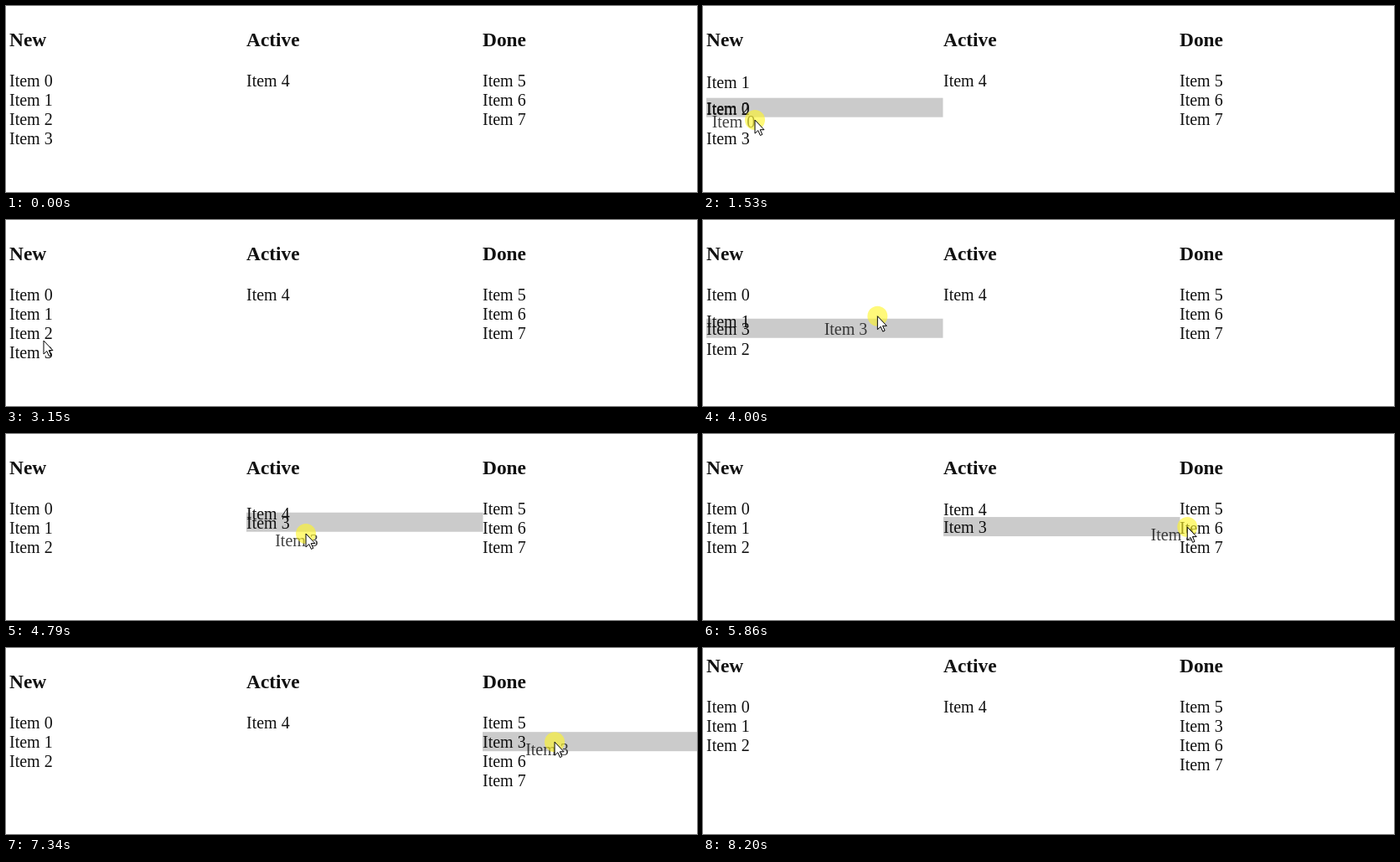
Recreate the animation shown at these times as an HTML page with a canvas. Size 825 px wide and 222 px high, loop 8.75 s.

```html
<!DOCTYPE html>
<html>
<head>
<meta charset="utf-8">
<style>
  html, body { margin: 0; width: 100%; height: 100%; overflow: hidden; background: #fff; }
  canvas { display: block; }
</style>
</head>
<body>
<canvas width="825" height="222"></canvas>
<script>
const ctx = document.querySelector('canvas').getContext('2d');
const LOOP = 8750, STEP = 10, SETTLE = 100, LAG = 30;
const LEFT = 4, COLUMN = 282.5, TOP = 77, ROW = 23, BASELINE = 19;
const titles = ['New', 'Active', 'Done'];
const FONT = '"Liberation Serif", "Times New Roman", serif';
const INK = '#111';
const clamp = (v, low, high) => Math.min(high, Math.max(low, v));

// Turning points of the pointer: time, x, y
const path = [
  [0, 400, 228], [700, 62, 90], [1000, 56, 87], [1400, 60, 110], [1530, 62, 136],
  [1850, 64, 157], [2600, 62, 90], [2850, 58, 90], [3150, 45, 144], [3450, 40, 151],
  [3750, 40, 151], [4200, 330, 88], [4560, 335, 86], [4790, 358, 119], [5100, 366, 72],
  [5400, 400, 92], [5860, 578, 111], [6200, 645, 77], [6450, 653, 90], [6640, 655, 132],
  [7000, 656, 118], [7400, 655, 112], [8080, 720, 245]
];

// dx, dy: where the item was grabbed
const drags = [
  { item: 0, from: 880, to: 2840, dx: 51, dy: 5 },
  { item: 3, from: 3600, to: 7380, dx: 35, dy: 3 }
];

function slope(i, axis) {
  const a = path[i], b = path[i + 1];
  return a && b ? (b[axis] - a[axis]) / (b[0] - a[0]) : null;
}

// Harmonic mean of both sides: smooth, without overshoot
function tangent(i, axis) {
  const before = slope(i - 1, axis), after = slope(i, axis);
  if (before === null || after === null) return before ?? after;
  return before * after > 0 ? 2 * before * after / (before + after) : 0;
}

function pointer(t) {
  const next = path.findIndex(p => p[0] > t);
  if (next < 0) return path.at(-1).slice(1);
  const i = next - 1, a = path[i], b = path[next];
  const h = b[0] - a[0], u = (t - a[0]) / h, v = 1 - u;
  return [1, 2].map(axis =>
    a[axis] + (b[axis] - a[axis]) * u * u * (3 - 2 * u) +
    h * u * v * (tangent(i, axis) * v - tangent(next, axis) * u));
}

function ghost(t, drag) {
  const [x, y] = pointer(Math.max(drag.from, t - LAG));
  return [x - drag.dx, y - drag.dy];
}

// The dragged item goes to the column of its ghost and the row of the pointer
function listsAt(t) {
  const lists = [[0, 1, 2, 3], [4], [5, 6, 7]];
  for (const drag of drags.filter(d => t >= d.from)) {
    const at = Math.min(t, drag.to);
    const col = clamp(Math.floor((ghost(at, drag)[0] + 26 - LEFT) / COLUMN), 0, 2);
    const row = Math.max(0, Math.floor((pointer(at)[1] - TOP) / ROW));
    lists[0].splice(lists[0].indexOf(drag.item), 1);
    lists[col].splice(row, 0, drag.item);
  }
  return lists;
}

// Items glide towards their row; a new column places them at once
function layout(t) {
  const items = [];
  const rest = Math.exp(-STEP / SETTLE);
  for (let s = t % STEP; s <= t; s += STEP) {
    listsAt(s).forEach((list, col) => list.forEach((id, row) => {
      const goal = TOP + row * ROW, old = items[id];
      items[id] = { col, y: old && old.col === col ? goal + (old.y - goal) * rest : goal };
    }));
  }
  return items;
}

function text(string, x, y, font = '20px ') {
  ctx.fillStyle = INK;
  ctx.font = font + FONT;
  ctx.fillText(string, x, y);
}

function drawPointer(x, y, pressed) {
  if (pressed) {
    ctx.fillStyle = 'rgba(255,245,40,.62)';
    ctx.beginPath();
    ctx.arc(x, y, 12, 0, Math.PI * 2);
    ctx.fill();
  }
  ctx.save();
  ctx.translate(x, y);
  const arrow = new Path2D('M0 0V16L3.8 12.5L6.4 18.4L8.8 17.3L6.2 11.6H11Z');
  ctx.fillStyle = '#fff';
  ctx.fill(arrow);
  ctx.strokeStyle = '#000';
  ctx.stroke(arrow);
  ctx.restore();
}

function draw(t) {
  ctx.fillStyle = '#fff';
  ctx.fillRect(0, 0, 825, 222);
  const items = layout(t);
  const drag = drags.find(d => t >= d.from && t < d.to);
  const columnX = col => LEFT + Math.round(col * COLUMN);

  ctx.save();
  ctx.translate(0, -19 * clamp((t - 8050) / 150, 0, 1));
  if (drag) {
    const { col, y } = items[drag.item];
    ctx.fillStyle = '#cbcbcb';
    ctx.fillRect(columnX(col), y, COLUMN, ROW);
  }
  titles.forEach((title, col) => text(title, columnX(col), 48, 'bold 23.4px '));
  items.forEach(({ col, y }, id) => text('Item ' + id, columnX(col), y + BASELINE));
  ctx.restore();

  if (drag) {
    const [x, y] = ghost(t, drag);
    ctx.globalAlpha = 0.8;
    text('Item ' + drag.item, x, y + BASELINE);
    ctx.globalAlpha = 1;
  }
  drawPointer(...pointer(t), drag);
}

function frame() {
  draw(performance.now() % LOOP);
  requestAnimationFrame(frame);
}
frame();
</script>
</body>
</html>
```
